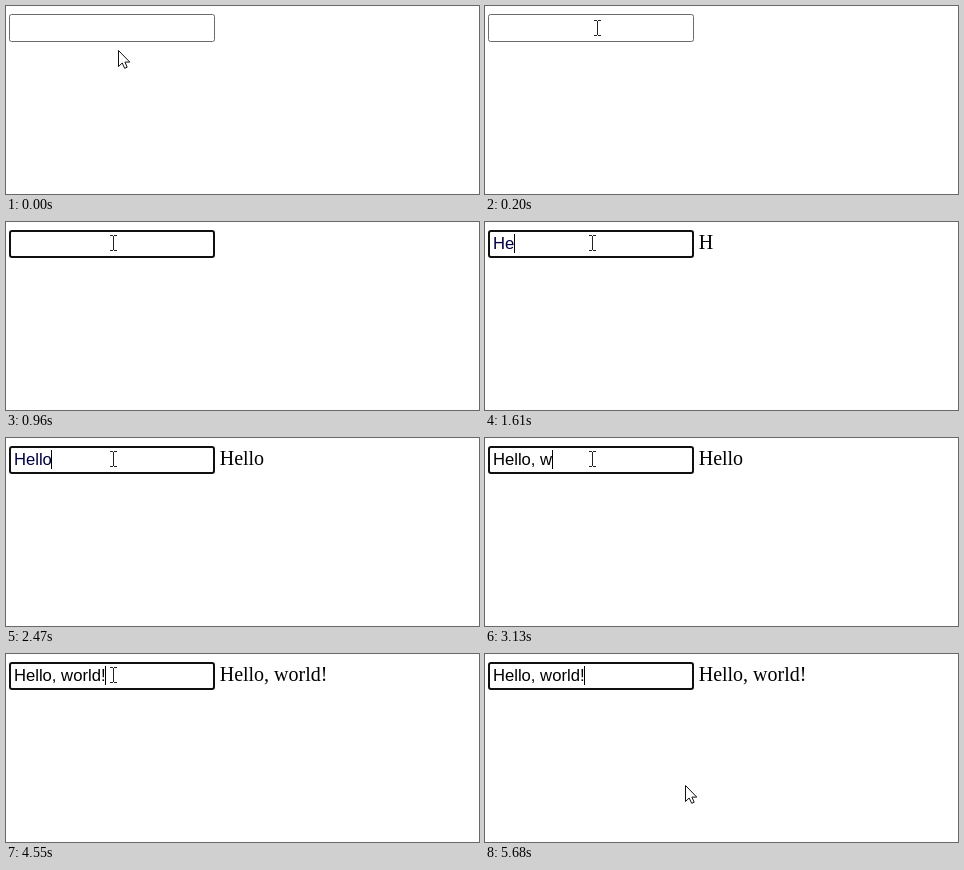
Recreate the animation shown at these times as an HTML page. Size 473 px wide and 188 px high, loop 5750 ms.

```html
<!DOCTYPE html>
<html lang="en">
<head>
<meta charset="utf-8">
<title>Live input echo</title>
<style>
  html, body { margin: 0; width: 100%; height: 100%; overflow: hidden; background: #fff; }
  svg { display: block; }
  text { font-kerning: none; }
  #typed { font: 16.667px "Liberation Sans", Arial, sans-serif; }
  #echo { font: 20px "Liberation Serif", "Times New Roman", serif; }
</style>
</head>
<body>
<svg width="473" height="188" viewBox="0 0 473 188">
  <rect id="idle" x="3.5" y="8.5" width="205" height="27" rx="2" fill="#fff" stroke="#6b6b6b"/>
  <rect id="focus" x="4" y="9" width="204" height="26" rx="2" fill="#fff" stroke="#101010" stroke-width="2"/>
  <text id="typed" x="7.9" y="27"></text>
  <text id="echo" x="213.7" y="27"></text>
  <rect id="caret" y="12" width="1" height="19" shape-rendering="crispEdges"/>
  <circle id="click" cx="110" cy="21" r="15" fill="#ff0" opacity=".55"/>
  <path id="arrow" d="M.5 .5V16.5L4.2 13L6.7 18.3L9.2 17.2L6.9 12.1H11.8Z" fill="#fff" stroke="#111"/>
  <path id="beam" d="M-3 .5H0M1 .5H4M.5 1V15M-3 15.5H0M1 15.5H4" fill="none" stroke="#222"/>
</svg>
<script>
const LOOP = 5750;
const MESSAGE = "Hello, world!";
const CARET_X = [8, 19, 29, 32, 36, 45, 50, 55, 67, 76, 81, 85, 94, 99];

// Each step holds only what changes: typed/echoed lengths, pointer, focus, caret, click ring.
const STEPS = [
  [0, { typed: 0, echo: 0, pointer: "arrow", at: [112, 44], focus: false, caret: false, click: false }],
  [70, { at: [112, 40] }],
  [130, { pointer: "beam", at: [112, 19] }],
  [200, { at: [112, 14] }],
  [270, { focus: true, click: true }],
  [340, { caret: true }],
  [470, { click: false }],
  [540, { at: [107, 13] }],
  [960, { caret: false }],
  [1400, { typed: 1, caret: true }],
  [1610, { typed: 2, echo: 1 }],
  [1870, { typed: 3, echo: 2 }],
  [2070, { typed: 4, echo: 3 }],
  [2140, { echo: 4 }],
  [2280, { typed: 5 }],
  [2470, { echo: 5 }],
  [2680, { typed: 6 }],
  [2800, { typed: 7 }],
  [3080, { typed: 8 }],
  [3150, { echo: 7 }],
  [3200, { typed: 9 }],
  [3330, { typed: 10 }],
  [3610, { echo: 10 }],
  [3670, { typed: 11 }],
  [3820, { typed: 12 }],
  [4090, { echo: 12 }],
  [4280, { typed: 13 }],
  [4550, { echo: 13 }],
  [4820, { caret: false }],
  [5410, { caret: true }],
  [5610, { pointer: "arrow", at: [160, 86] }],
  [5680, { at: [200, 131] }]
];

const el = id => document.getElementById(id);
const show = (id, on) => el(id).setAttribute("visibility", on ? "visible" : "hidden");

function stateAt(time) {
  const past = STEPS.filter(([start]) => start <= time);
  return Object.assign({}, ...past.map(([, change]) => change));
}

function draw(time) {
  const s = stateAt(time);
  show("idle", !s.focus);
  show("focus", s.focus);
  show("caret", s.caret);
  show("click", s.click);
  show("arrow", s.pointer === "arrow");
  show("beam", s.pointer === "beam");
  el(s.pointer).setAttribute("transform", `translate(${s.at})`);
  el("caret").setAttribute("x", CARET_X[s.typed]);
  el("typed").textContent = MESSAGE.slice(0, s.typed);
  el("typed").setAttribute("fill", s.typed < 6 ? "#000040" : "#000");
  el("echo").textContent = MESSAGE.slice(0, s.echo);
}

const began = performance.now();
function tick() {
  draw((performance.now() - began) % LOOP);
  requestAnimationFrame(tick);
}
tick();
</script>
</body>
</html>
```
